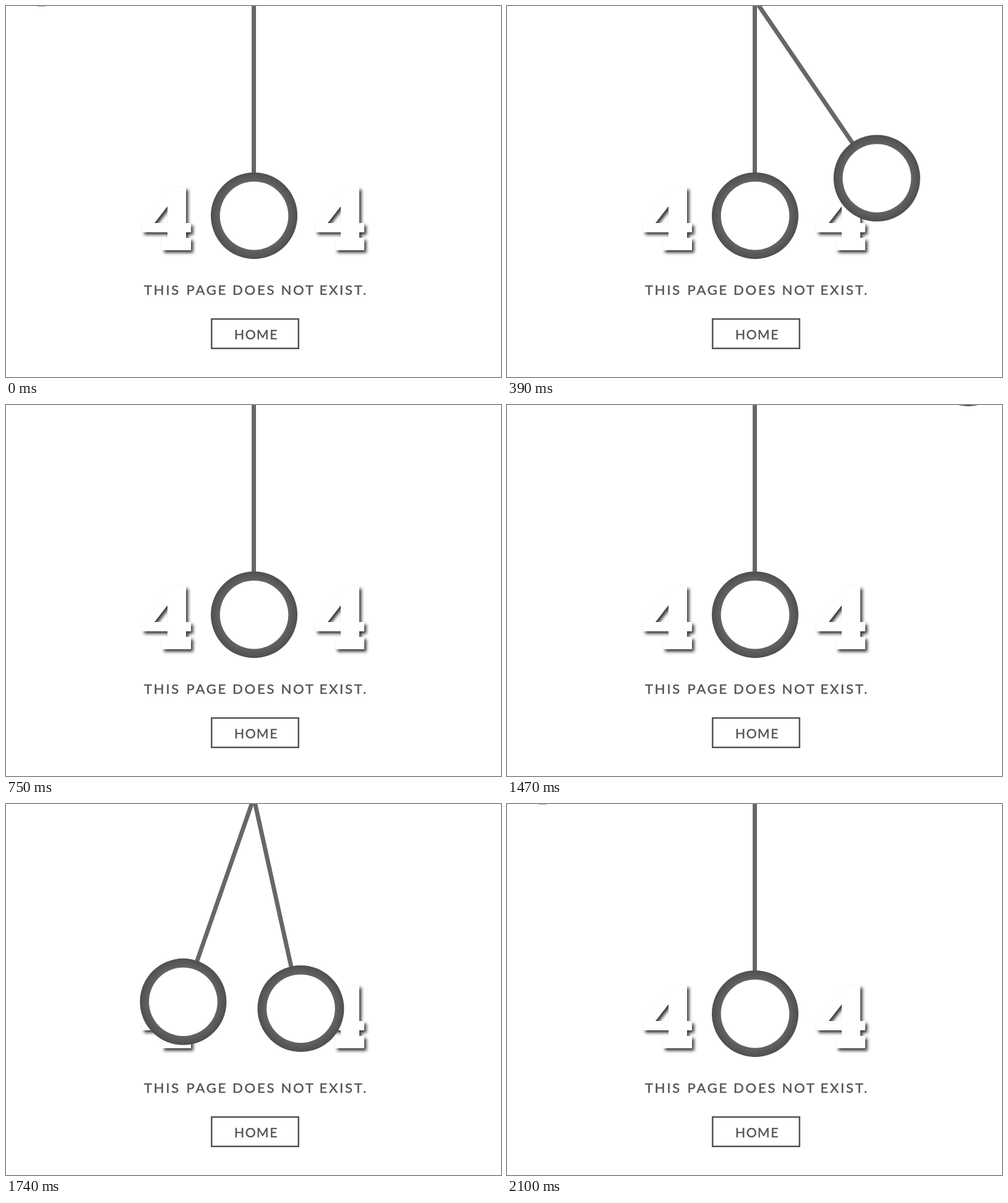
An HTML page with a canvas for the animation above (2.73 s loop, 800 by 600 pixels).

```html
<!DOCTYPE html>
<html lang="en">
<head>
<meta charset="utf-8">
<title>404</title>
<style>
  html, body { margin: 0; width: 100%; height: 100%; overflow: hidden; background: #fff; }
  canvas { display: block; width: 800px; height: 600px; }
</style>
</head>
<body>
<canvas id="stage" width="800" height="600"></canvas>
<script>
const ctx = document.getElementById('stage').getContext('2d');
const LOOP = 2730, STEP = 30;
const PIVOT = { x: 400.5, y: -10 };
const LENGTH = 349.2, OUTER = 70, INNER = 55.3;
const INK = '#565556', POWER = 1.169;

// Outline of the slab digit, then its counter
const FOUR = [
  [220, 366], [220, 352], [267, 293], [291, 293], [291, 351], [299, 351],
  [299, 366], [291, 366], [291, 375], [299, 375], [299, 395], [252, 395],
  [252, 375], [261, 375], [261, 366]
];
const COUNTER = [[240, 351], [261, 351], [261, 324]];

const progress = (t, from, to) => Math.min(1, Math.max(0, (t - from) / (to - from)));
const fall = (t, from, to) => 1 - progress(t, from, to) ** POWER;
const rise = (t, from, to) => 1 - (1 - progress(t, from, to)) ** POWER;

function polygon(points) {
  points.forEach(([x, y], i) => i ? ctx.lineTo(x, y) : ctx.moveTo(x, y));
  ctx.closePath();
}

function disc(x, y, radius, fill) {
  ctx.fillStyle = fill;
  ctx.beginPath();
  ctx.arc(x, y, radius, 0, Math.PI * 2);
  ctx.fill();
}

function drawFour(dx) {
  ctx.save();
  ctx.translate(dx, 0);
  ctx.shadowColor = 'rgba(0, 0, 0, 0.77)';
  ctx.shadowBlur = 5;
  ctx.shadowOffsetX = 3.5;
  ctx.shadowOffsetY = 4;
  ctx.fillStyle = '#fff';
  ctx.beginPath();
  polygon(FOUR);
  polygon(COUNTER);
  ctx.fill('evenodd');
  ctx.restore();
}

// A thin outline gives a weight between regular and bold
function drawText(text, x, y, size, spacing) {
  ctx.font = `400 ${size}px Lato, "Open Sans", sans-serif`;
  ctx.letterSpacing = spacing + 'px';
  ctx.lineWidth = 0.5;
  ctx.fillText(text, x, y);
  ctx.strokeText(text, x, y);
}

function drawLabels() {
  ctx.fillStyle = ctx.strokeStyle = INK;
  [['THIS', 223], ['PAGE', 291.5], ['DOES', 366], ['NOT', 444.5], ['EXIST.', 506.5]]
    .forEach(([word, x]) => drawText(word, x, 467, 22, 2.8));
  drawText('HOME', 369, 539, 21, 1.6);
  ctx.lineWidth = 2.5;
  ctx.strokeRect(332.25, 506.25, 140.5, 47.5);
}

function drawPendulum(degrees) {
  const a = degrees * Math.PI / 180;
  const x = PIVOT.x + LENGTH * Math.sin(a);
  const y = PIVOT.y + LENGTH * Math.cos(a);

  ctx.strokeStyle = '#676767';
  ctx.lineWidth = 7;
  ctx.beginPath();
  ctx.moveTo(PIVOT.x, PIVOT.y);
  ctx.lineTo(x, y);
  ctx.stroke();

  const cx = x + 0.5;
  const shade = ctx.createRadialGradient(cx, y, INNER, cx, y, OUTER);
  shade.addColorStop(0, '#646363');
  shade.addColorStop(1, '#504f4f');
  disc(cx, y, OUTER, shade);
  disc(cx, y, INNER, '#fff');
}

function leftAngle(t) {
  return -99.8 * (t < LOOP / 2 ? fall(t, 0, 326) : rise(t, 1668, 2100));
}

function rightAngle(t) {
  return 100.2 * (t < LOOP / 2 ? rise(t, 240, 738) : fall(t, 1466, 1773));
}

function draw(t) {
  ctx.fillStyle = '#fff';
  ctx.fillRect(0, 0, 800, 600);
  drawFour(0);
  drawFour(280);
  drawLabels();
  drawPendulum(leftAngle(t));
  drawPendulum(rightAngle(t));
}

let start;
function tick(now) {
  start ??= now;
  const t = (now - start) % LOOP;
  draw(Math.floor(t / STEP) * STEP);
  requestAnimationFrame(tick);
}
draw(0);
requestAnimationFrame(tick);
</script>
</body>
</html>
```
